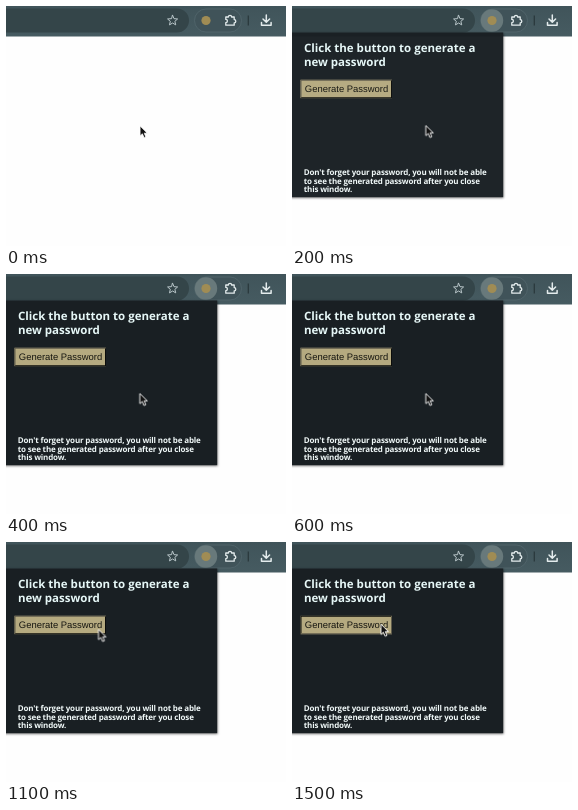
These frames come from a looping animation (280 by 240 pixels, 1.6 s). An HTML page:

```html
<!DOCTYPE html>
<html lang="en">
<head>
<meta charset="utf-8">
<title>Password popup</title>
<style>
  html, body { margin: 0; width: 100%; height: 100%; overflow: hidden; background: #fefefe; }
  svg { display: block; width: 280px; height: 240px; text-rendering: geometricPrecision; }
  .bold { font-family: "Open Sans", "Noto Sans", sans-serif; font-weight: 700; fill: #e6f7f7; }
  .title { font-size: 11.5px; }
  .note { font-size: 8px; letter-spacing: -.17px; fill: #f0f8f8; }
  .label { font: 9.45px "Liberation Sans", Arial, sans-serif; fill: #15150f; }
  .icon { fill: none; stroke: #e4eced; stroke-linejoin: round; stroke-linecap: round; }
</style>
</head>
<body>
<svg viewBox="0 0 280 240">
  <defs>
    <linearGradient id="bar" x2="0" y2="1">
      <stop stop-color="#40545a"/>
      <stop offset="1" stop-color="#465b61"/>
    </linearGradient>
    <filter id="shade" x="-5%" y="-5%" width="112%" height="112%" color-interpolation-filters="sRGB">
      <feDropShadow dx="0.4" dy="0.8" stdDeviation="1" flood-color="#000" flood-opacity=".55"/>
    </filter>
  </defs>

  <!-- toolbar -->
  <rect width="280" height="30.5" fill="url(#bar)"/>
  <rect x="-20" y="2.5" width="203" height="24" rx="12" fill="#344549"/>
  <path id="star" class="icon" stroke-width="1" style="stroke: #b9c6c9"/>
  <rect x="188.5" y="3" width="47" height="23" rx="11.5" fill="#405359" stroke="#53686e" stroke-width=".8"/>
  <circle id="halo" cx="200" cy="14.5" r="11.2" fill="#68797b"/>
  <circle cx="200" cy="14.5" r="4.6" fill="#a08c54"/>
  <path class="icon" stroke-width="1.3"
    d="M219.8 11h2.6a1.6 1.6 0 1 1 3.2 0h2.6v2.6a1.6 1.6 0 1 1 0 3.2v2.4h-8.4v-2.6a1.6 1.6 0 1 0 0-3.2z"/>
  <path d="M242.3 9.5v10" stroke="#2b393d" stroke-width="1.3"/>
  <path class="icon" stroke-width="1.5" d="M260.3 9v7M257 13l3.3 3.3 3.3-3.3M255.5 16.5v2.8h9.6v-2.8"/>

  <!-- popup -->
  <g id="popup">
    <rect x="-4" y="26.5" width="215.2" height="164.7" fill="#191f23" filter="url(#shade)"/>
    <g class="bold title">
      <text x="11.9" y="45.8">Click the button to generate a</text>
      <text x="11.9" y="59.8">new password</text>
    </g>
    <rect x="8.5" y="73.8" width="91.5" height="18.4" fill="#b5aa80"/>
    <path id="lit" d="M8.5 92.2V73.8H100l-1 1H9.5v16.4z" fill="#5f5b4b"/>
    <path id="dark" d="M100 73.8v18.4H8.5l1-1H99V74.8z" fill="#0b0c0a"/>
    <text class="label" x="12.8" y="86.1">Generate Password</text>
    <g class="bold note">
      <text x="11.8" y="169.3">Don't forget your password, you will not be able</text>
      <text x="11.8" y="177.8">to see the generated password after you close</text>
      <text x="11.8" y="186.4">this window.</text>
    </g>
  </g>

  <g id="cursor">
    <path id="arrow" d="M0 0V10.2L2.4 8.1 4.1 12 6 11.2 4.3 7.4H7.5Z"
      fill="#111" stroke="#fff" stroke-width=".9" stroke-linejoin="round"/>
  </g>
</svg>
<script>
  const LOOP = 1600;
  const $ = id => document.getElementById(id);

  const points = Array.from({ length: 10 }, (_, i) => {
    const a = i * Math.PI / 5 - Math.PI / 2, r = i % 2 ? 2.4 : 5.3;
    return `${(166.6 + r * Math.cos(a)).toFixed(2)} ${(14.6 + r * Math.sin(a)).toFixed(2)}`;
  });
  $("star").setAttribute("d", `M${points.join("L")}Z`);

  // Each step is [time in ms, value], held until the next one.
  function hold(id, prop, steps) {
    const frames = steps.map(([t, v]) => ({ offset: t / LOOP, [prop]: v, easing: "steps(1, end)" }));
    frames.push({ offset: 1, [prop]: steps.at(-1)[1] });
    $(id).animate(frames, { duration: LOOP, iterations: Infinity });
  }

  const at = (x, y) => `translate(${x}px, ${y}px)`;

  hold("popup", "opacity", [[0, 0], [100, 0.93], [200, 0.98], [300, 1]]);
  hold("halo", "opacity", [[0, 0], [100, 1]]);
  hold("cursor", "transform", [
    [0, at(134, 119.8)], [100, at(133.8, 119.5)], [800, at(124, 113)], [900, at(110.8, 104)],
    [1000, at(100, 94.5)], [1100, at(92.5, 87.5)], [1200, at(89.5, 84.3)], [1300, at(88.6, 83.6)],
    [1400, at(89, 82.2)]
  ]);
  hold("lit", "fill", [[0, "#5f5b4b"], [1400, "#0b0c0a"]]);
  hold("dark", "fill", [[0, "#0b0c0a"], [1400, "#5f5b4b"]]);
</script>
</body>
</html>
```
